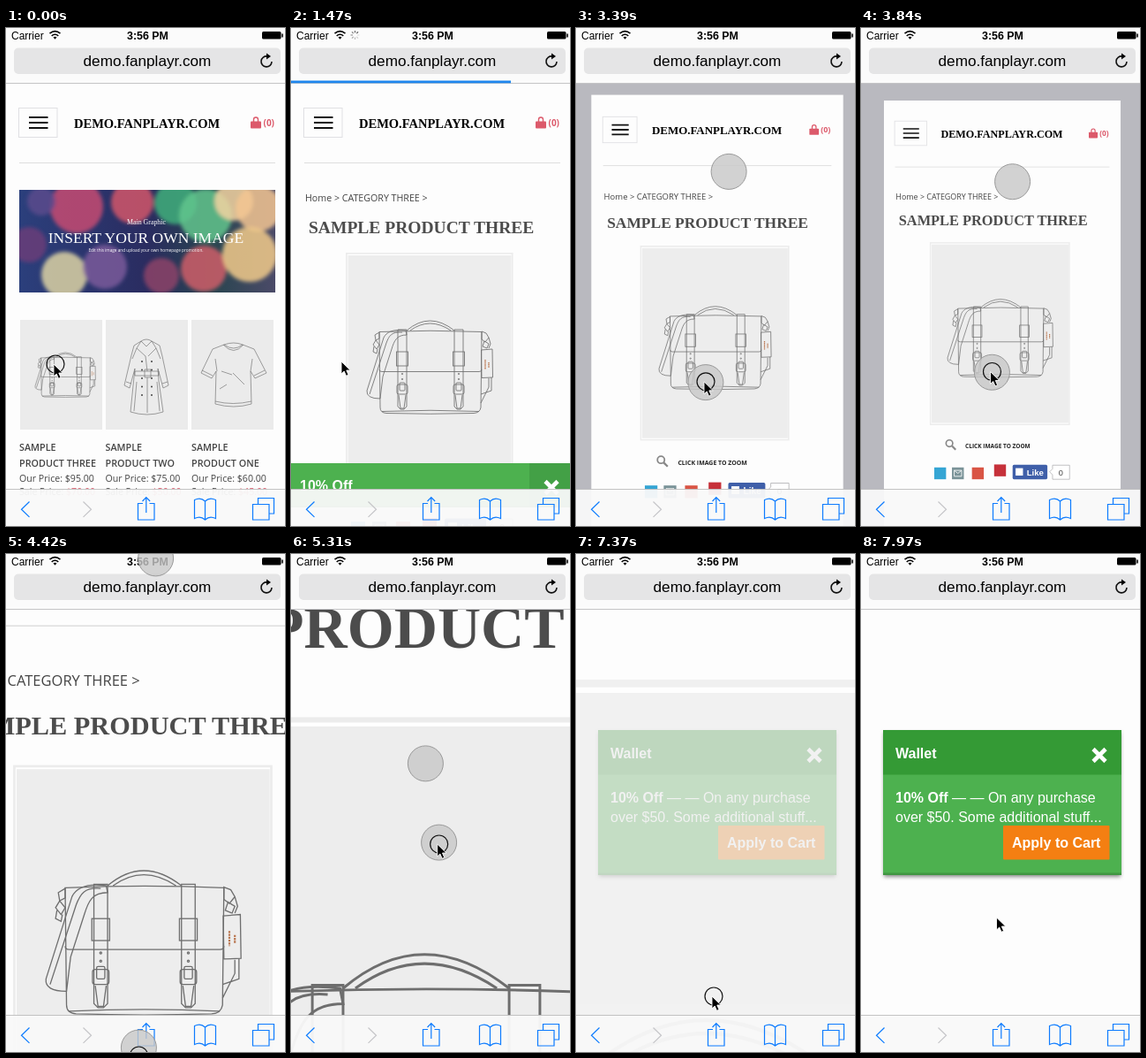
These frames come from a looping animation (316 px wide and 563 px high, 8000 ms). An HTML page:

```html
<!DOCTYPE html>
<html lang="en">
<head>
<meta charset="utf-8">
<title>Pinch zoom demo</title>
<style>
html, body { margin: 0; width: 100%; height: 100%; overflow: hidden; background: #fdfdfd; }
svg { display: block; width: 100%; height: 100%; }
.ui { font-family: "Liberation Sans", Arial, sans-serif; }
.body { font-family: "Open Sans", "Noto Sans", sans-serif; fill: #444; }
.serif { font-family: "Liberation Serif", "Times New Roman", serif; }
.b { font-weight: 700; }
.sb { font-weight: 600; }
.line { fill: none; stroke: #0c7bff; stroke-width: 1.2; }
.ink { fill: none; stroke: #6e6e6e; stroke-width: .85; }
.ink .f { fill: #eee; }
.fine { stroke-width: .65; }
</style>
</head>
<body>
<svg viewBox="0 0 316 563" xmlns="http://www.w3.org/2000/svg">
<defs>
  <clipPath id="heroClip"><rect x="15" y="183" width="290" height="116"/></clipPath>
  <clipPath id="viewClip"><rect y="62" width="316" height="501"/></clipPath>
  <linearGradient id="heroTone">
    <stop offset="0" stop-color="#2b3f7c"/><stop offset=".5" stop-color="#2a2c60"/>
    <stop offset=".75" stop-color="#28454f"/><stop offset="1" stop-color="#4b4a68"/>
  </linearGradient>
  <filter id="blur" x="-50%" y="-50%" width="200%" height="200%"><feGaussianBlur stdDeviation="2"/></filter>
  <path id="cross" d="M-7-7 7 7M7-7-7 7" stroke="#fff" stroke-width="4.6"/>
  <g id="buckles">
    <path class="f" d="M121 341h10v87l-3 3h-4l-3-3z"/>
    <rect class="f" x="119.500" y="366" width="13" height="16"/>
    <rect class="f" x="120" y="403" width="12" height="11" rx="2"/>
    <rect x="123" y="401" width="6" height="9" rx="1"/>
    <path d="M122 415l2 15h4l2-15"/>
    <circle cx="126" cy="391" r=".7"/><circle cx="126" cy="397" r=".7"/>
  </g>
  <g id="bag">
    <path d="M131 342Q157 320 185 342M135 342Q157 326 181 342"/>
    <path d="M227 395V410L215 414M224 396V406L215 424"/>
    <path class="f" d="M100 343.500Q158 341 216 343.500L215 429Q214 435 207 435.500Q158 437 108 435.500Q101 435 101 429Z"/>
    <path d="M100 386Q100 388.500 103 388.500H213Q216 388.500 216 386M103 433.500Q158 431 213 433.500"/>
    <path d="M100 344l-5 3 1 6 4-2zM96 353l-3 5 4 5 3-5zM94 360l-1 6 4 2 1-5"/>
    <path d="M216 343l5 2 3 5-4 5-4-3zM219 354l5 3-2 5-5-2zM224 350l2 7-2 5"/>
    <path class="f" d="M130 342C115 340 108 344 105 350L86 410Q85 419 101 419L104 394L114 363C117 353 120 347 131 347Z"/>
    <path d="M126 344C114 343 111 348 108 356L89 414"/>
    <path class="f" d="M215.500 364l12.500-1 .5 32-12.500 .5z"/>
    <path d="M220 375v11M224 378v6" stroke="#b9744d" stroke-width="1.400" stroke-dasharray="1.500 .6"/>
    <use href="#buckles"/><use href="#buckles" x="64"/>
  </g>
</defs>

<rect width="316" height="563" fill="#b9b9bf"/>

<g clip-path="url(#viewClip)">
  <g id="page">
    <rect y="62.800" width="320" height="1200" fill="#fdfdfd"/>
    <rect x="14.500" y="90.500" width="43.500" height="33" fill="none" stroke="#e0e0e3"/>
    <path d="M26 101h21.500M26 107h21.500M26 113h21.500" stroke="#111" stroke-width="2"/>
    <text class="serif b" x="77" y="112.500" font-size="14.500">DEMO.FANPLAYR.COM</text>
    <path d="M280.500 106v-2.500a2.500 2.500 0 0 1 5 0v2.500" fill="none" stroke="#dc5a6b" stroke-width="1.400"/>
    <rect x="277" y="105.500" width="12" height="8" rx="1" fill="#dc5a6b"/>
    <text class="body b" x="291.500" y="110.500" font-size="10" style="fill:#dc5a6b">(0)</text>
    <path d="M15 152.500H305" stroke="#dedede"/>

    <g id="list">
      <g clip-path="url(#heroClip)">
        <rect x="15" y="183" width="290" height="116" fill="url(#heroTone)"/>
        <g id="bokeh" filter="url(#blur)"></g>
      </g>
      <g fill="#fff" text-anchor="middle">
        <text class="serif" x="159" y="222" font-size="7.900">Main Graphic</text>
        <text class="serif" x="158.500" y="242.500" font-size="17.550">INSERT YOUR OWN IMAGE</text>
        <text class="body" x="158.500" y="253" font-size="4.700" style="fill:#fff">Edit this image and upload your own homepage promotion.</text>
      </g>
      <g id="cards"></g>
      <use href="#bag" class="ink" transform="translate(-8.300 208) scale(.48)" style="stroke-width:1.2"/>
      <g class="ink fine">
        <path d="M153 354q6-4 12 0l9 5 3 12 7 33-6 3-6-22 1 14 5 35q-18 6-37 0l5-49-6 22-6-3 8-34 3-11z"/>
        <path d="M153 354l-5 8 10 9 2 17M165 354l5 8-9 9M159 360l-6-6M159 360l6-6M146 388h27v5h-27zM157 386h7v9h-7zM160 395v40M148 362l-5 12M170 362l5 12M148 400l-3 33M171 400l3 33M136 400l6 2M183 400l-6 2"/>
        <path d="M154 377v40M165 377v40" stroke="#444" stroke-width="2" stroke-linecap="round" stroke-dasharray="0 9.500"/>
        <path d="M247 358q11 8 21 0l13 5 14 27-13 6-5-8 1 37q-20 6-41 0l1-37-5 8-12-6 13-27z"/>
        <path d="M246 358q12 13 23 0M247 358q11-4 21 0M239 388l-2-14M277 388l2-14M222 387l12 6M293 387l-12 6M237 422q20 5 41 0M244 388l12 4M257 390l13 13M242 408l8-5"/>
      </g>
    </g>

    <g id="product">
      <text class="body" x="16" y="196" font-size="10.650">Home &gt; CATEGORY THREE &gt;</text>
      <text class="serif b" x="20" y="231.500" font-size="19.550" fill="#4c4c4c">SAMPLE PRODUCT THREE</text>
      <rect x="62" y="254" width="189.500" height="247" fill="#ececec"/>
      <rect x="63.750" y="255.750" width="186" height="243.500" fill="#fff"/>
      <rect x="64.500" y="257" width="185" height="241" fill="#ededed"/>
      <use href="#bag" class="ink"/>
      <circle cx="88.500" cy="525.500" r="4.500" fill="none" stroke="#888" stroke-width="2"/>
      <path d="M92 529l5 5" stroke="#888" stroke-width="2.600"/>
      <text class="body b" x="110" y="531.500" font-size="7.800" style="fill:#222">CLICK IMAGE TO ZOOM</text>
      <rect x="68" y="558" width="16" height="16" fill="#35a5d4"/>
      <rect x="92" y="558" width="16" height="16" fill="#7a9398"/>
      <path d="M95 562h10v8h-10zl5 4 5-4" fill="none" stroke="#fff"/>
      <rect x="119" y="558" width="16" height="16" fill="#d95545"/>
      <rect x="149" y="554" width="16" height="16" fill="#c6313a"/>
      <rect x="174" y="554.500" width="47" height="19.500" rx="2" fill="#3f5fa9"/>
      <rect x="178" y="559" width="10" height="10" fill="#fff"/>
      <text class="ui b" x="193" y="568.500" font-size="11.500" fill="#fff">Like</text>
      <path d="M228 555h23v19h-23v-6l-4-4 4-4z" fill="#fff" stroke="#b5b5b8"/>
      <text class="ui" x="236" y="568.500" font-size="11" fill="#444">0</text>
    </g>
  </g>
</g>

<g id="banner">
  <rect width="316" height="50" fill="#4db14f"/>
  <rect x="270" width="46" height="50" fill="#43a046"/>
  <rect y="48" width="316" height="2" fill="#3b8f3d"/>
  <text class="ui b" x="10" y="31" font-size="16" fill="#fff">10% Off</text>
  <use href="#cross" x="295" y="27.500"/>
</g>

<g id="wallet">
  <rect y="62" width="316" height="501" fill="#fdfdfd"/>
  <rect x="26" y="202" width="268" height="163" fill="#888" filter="url(#blur)"/>
  <rect x="25" y="199" width="270" height="164" fill="#4db14f"/>
  <rect x="25" y="199" width="270" height="50.500" fill="#349a35"/>
  <rect x="25" y="360.500" width="270" height="2.500" fill="#419643"/>
  <g class="ui" font-size="16" fill="#fff">
    <text class="b" x="39" y="231">Wallet</text>
    <text x="39" y="280.500"><tspan class="b">10% Off</tspan> — — On any purchase</text>
    <text x="39" y="302.500">over $50. Some additional stuff...</text>
    <rect x="161" y="307" width="120.500" height="38.500" rx="1" fill="#f47f12"/>
    <text class="b" x="171" y="332">Apply to Cart</text>
  </g>
  <use href="#cross" x="270" y="227.500"/>
</g>

<g id="bars">
  <rect width="316" height="62" fill="#fbfbfb"/>
  <path d="M0 62.500H316" stroke="#c4c4c6"/>
  <rect id="progress" y="59.500" height="2.800" fill="#1f87ee"/>
  <g class="ui">
    <text x="6" y="12.500" font-size="12">Carrier</text>
    <text class="b" x="160.500" y="12.500" font-size="12.400" text-anchor="middle">3:56 PM</text>
    <rect x="9" y="22.500" width="302" height="29.500" rx="5" fill="#e5e5e6"/>
    <text x="160" y="42.500" font-size="17.150" text-anchor="middle">demo.fanplayr.com</text>
  </g>
  <path d="M49.500 6.200q6-5 12 0M51.700 8.800q3.800-3 7.600 0" fill="none" stroke="#000" stroke-width="1.600"/>
  <path d="M53.500 10.500q2-1.500 4 0l-2 2.300z"/>
  <rect x="290" y="4" width="21.500" height="8.500" rx="1.500"/><rect x="312.300" y="6.500" width="1.500" height="4"/>
  <path d="M296 32a6 6 0 1 0 5 6" fill="none" stroke="#111" stroke-width="1.600"/>
  <path d="M295 28.500l5 3.500-5 3.500z"/>
  <g id="spinner" stroke-width="1.100"></g>

  <rect y="521" width="316" height="42" fill="#f9f9f9" opacity=".95"/>
  <path d="M0 521.500H316" stroke="#000" stroke-opacity=".22"/>
  <path class="line" d="M26.500 535.500l-9 8.700 9 8.700"/>
  <path class="line" d="M87.500 535.500l9 8.700-9 8.700" style="stroke:#c5c5c8"/>
  <path class="line" d="M155 537.500h-5.500v18.500h18.500v-18.500h-5.500M158.800 548v-17.500M154.500 535l4.300-4.500 4.300 4.500"/>
  <path class="line" d="M225.500 535q-5-5-12-1.500v21q7-3.500 12 1.500 5-5 12-1.500v-21q-7-3.500-12 1.500v21"/>
  <path class="line" d="M285.500 538v-6.500h18v17.500h-5M279.500 538.500h18.500v17.500h-18.500z"/>
</g>

<g id="touches"></g>
<g id="cursor">
  <circle id="ring" cx="2" r="10" fill="none" stroke="#111" stroke-width="1.200"/>
  <path d="M0 0V14l3.200-3 2.300 5.300 2.600-1.100-2.300-5.200h4.500z" stroke="#fff" stroke-width=".9"/>
</g>
</svg>

<script>
const LOOP = 8000, TICK = 147.4, LAG = .2, MID = { x: 160, y: 281.5 };
const el = id => document.getElementById(id);
const show = (node, on) => node.setAttribute("visibility", on ? "inherit" : "hidden");
const within = (k, from, to) => k >= from && k < to;

// Each key is [tick, ...values]; values are linear in between.
function track(keys, k) {
  const i = keys.findIndex(key => key[0] > k);
  if (i < 0) return keys[keys.length - 1].slice(1);
  if (i === 0) return keys[0].slice(1);
  const a = keys[i - 1], b = keys[i], p = (k - a[0]) / (b[0] - a[0]);
  return a.slice(1).map((v, n) => v + (b[n + 1] - v) * p);
}

const pointer = [
  [0, 54, 380], [3, 57, 377], [12, 57, 377], [18, 142.5, 415], [19, 143, 415],
  [26, 146.5, 388.5], [30, 148.5, 567], [32, 150, 610], [33, 165, 305], [34, 165, 309],
  [40, 167, 366], [41, 167, 370], [43, 167, 374], [48, 154, 514], [50, 154, 500], [54, 153.5, 411]
];
const zoom = [
  [19, 1], [25, .8376], [26, .8376], [30, 1.55], [33, 2.04],
  [34, 2.1], [40, 6.25], [41, 6.45], [43, 6.45], [46, 5]
];
const bannerIn = [[8, 522], [10, 492], [12, 472]];
const bannerBack = [[42, 522], [46, 472]];

function build() {
  const spots = [
    [26, 245, 20, "#6a3d78"], [80, 202, 30, "#c64a72"], [66, 279, 26, "#dcd3a4"],
    [112, 270, 25, "#7a5a9a"], [143, 197, 24, "#d2566a"], [40, 196, 16, "#5a4a8c"],
    [176, 280, 20, "#8c4468"], [192, 198, 24, "#3fae7c"], [226, 212, 30, "#62c58c"],
    [224, 272, 26, "#cf5f68"], [258, 196, 22, "#f3d3a0"], [286, 204, 26, "#f2c592"],
    [276, 256, 31, "#f1ca8a"]
  ];
  el("bokeh").innerHTML = spots.map(([x, y, r, c]) =>
    `<circle cx="${x}" cy="${y}" r="${r}" fill="${c}" opacity=".85"/>`).join("");

  const items = [["THREE", "95", "70"], ["TWO", "75", "50"], ["ONE", "60", "45"]];
  el("cards").innerHTML = items.map(([name, price, sale], i) => {
    const x = 16 + 97 * i;
    return `<rect x="${x}" y="330" width="93" height="124" fill="#ebebeb"/>
      <g class="body" font-size="10.600" transform="translate(${15 + 97.5 * i})">
        <text class="sb" y="478" font-size="10.800">SAMPLE</text>
        <text class="sb" y="496" font-size="10.800">PRODUCT ${name}</text>
        <text y="513">Our Price: $${price}.00</text>
        <text y="528">Sale Price: <tspan fill="#dc5a6b">$${sale}.00</tspan></text></g>`;
  }).join("");

  el("spinner").innerHTML = Array.from({ length: 8 }, (_, i) =>
    `<path d="M0-2.500V-5" transform="rotate(${i * 45})"
      stroke="rgb(${Array(3).fill(225 - i * 20)})"/>`).join("");

  el("touches").innerHTML = `<g><circle class="shade" cx="4" cy="4" r="20" fill="#777"
      opacity=".5" filter="url(#blur)"/>
    <circle r="20" fill="#c9c9c9" fill-opacity=".8" stroke="#999"/></g>`.repeat(2);
}

function draw(time) {
  const k = Math.floor((time % LOOP + 15) / TICK);
  const [x, y] = track(pointer, k);
  const pressed = k < 1 || within(k, 19, 33) || within(k, 34, 43) || k === 50;

  const [s] = track(zoom, k), cy = s < 1 ? 181 : 282;
  el("page").setAttribute("transform", `translate(${160 * (1 - s)} ${cy * (1 - s)}) scale(${s})`);
  show(el("list"), k < 7);
  show(el("product"), k >= 7);

  show(el("spinner"), within(k, 3, 12));
  el("spinner").setAttribute("transform", `translate(72.500 8) rotate(${k * 45})`);
  const [loaded] = track([[3, 40], [10, 249], [11, 316]], k);
  el("progress").setAttribute("width", within(k, 3, 12) ? loaded : 0);

  show(el("banner"), within(k, 9, 19) || within(k, 43, 50));
  const [top] = track(k < 19 ? bannerIn : bannerBack, k);
  el("banner").setAttribute("transform", `translate(0 ${top})`);
  el("wallet").setAttribute("opacity", track([[49, 0], [53, 1]], k)[0]);

  // The touch dots trail the pointer slightly and mirror each other.
  show(el("touches"), within(k, 15, 33) || within(k, 34, 48));
  const [upper, lower] = el("touches").children;
  const [px, ty] = track(pointer, k - LAG), tx = px + 2;
  lower.setAttribute("transform", `translate(${tx} ${ty})`);
  upper.setAttribute("transform", `translate(${2 * MID.x - tx} ${2 * MID.y - ty})`);
  for (const shade of document.querySelectorAll(".shade")) shade.setAttribute("opacity", pressed ? 0 : .5);

  el("cursor").setAttribute("transform", `translate(${x} ${y})`);
  show(el("ring"), pressed);
}

build();
const start = performance.now();
(function frame() {
  draw(performance.now() - start);
  requestAnimationFrame(frame);
})();
</script>
</body>
</html>
```
